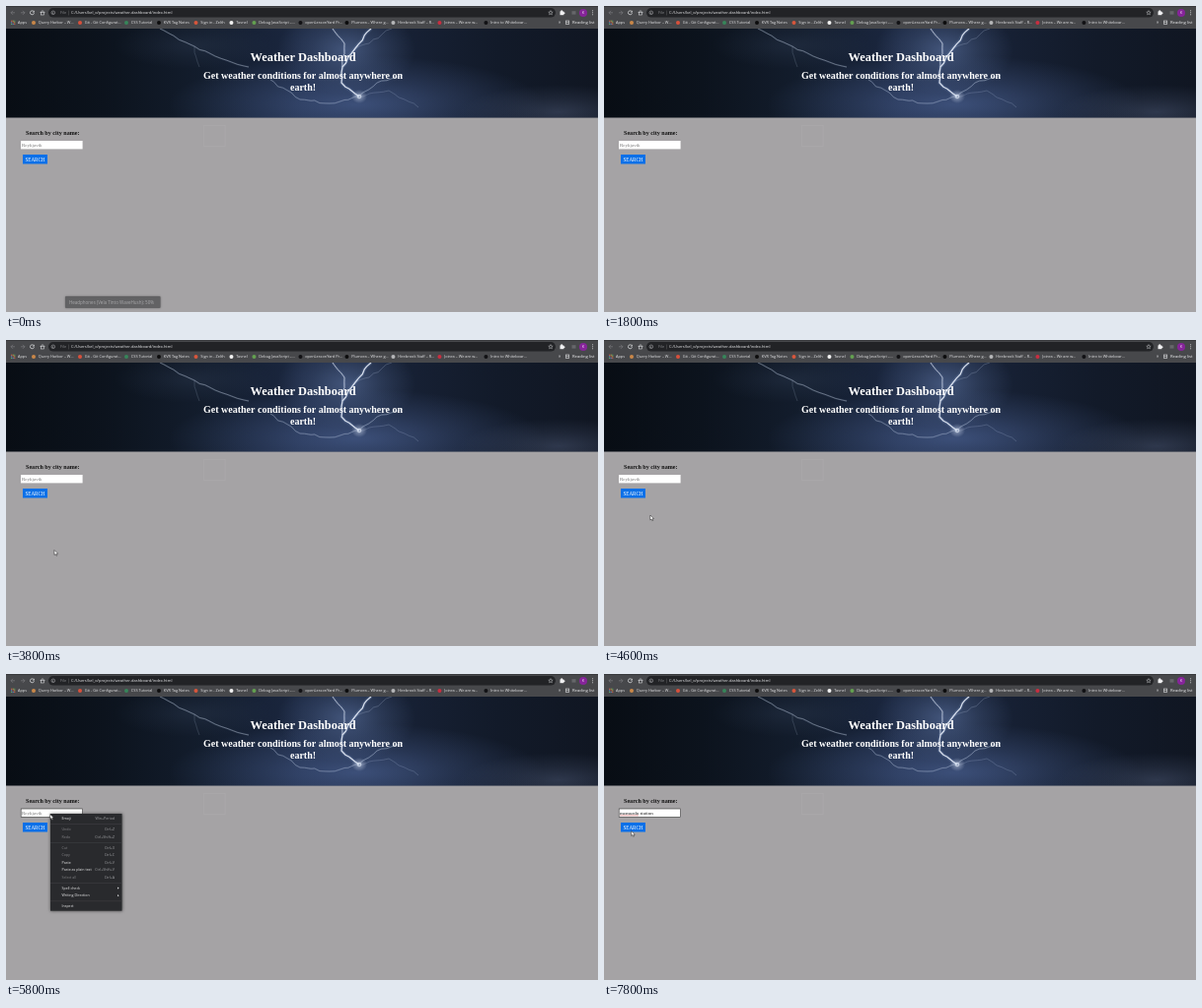
An HTML page with a canvas for the animation above (8 s loop, 600 px wide and 311 px high).

```html
<!DOCTYPE html>
<html lang="en">
<head>
<meta charset="utf-8">
<title>Weather Dashboard</title>
<style>
html, body { margin: 0; width: 100%; height: 100%; overflow: hidden; background: #a5a3a5; }
canvas { display: block; width: 600px; height: 311px; }
</style>
</head>
<body>
<canvas id="stage"></canvas>
<script>
const W = 600, H = 311, LOOP = 8000, STEP = 200;
const SANS = '"Open Sans", "Noto Sans", sans-serif';
const SERIF = '"Liberation Serif", serif';
const TOAST_END = 800, FOCUS = 5200, MENU_OPEN = 5800, PASTE = 7200;

const canvas = document.getElementById('stage');
const ratio = window.devicePixelRatio || 1;
canvas.width = W * ratio;
canvas.height = H * ratio;
const ctx = canvas.getContext('2d');
ctx.scale(ratio, ratio);

function rect(x, y, w, h, color) {
  ctx.fillStyle = color;
  ctx.fillRect(x, y, w, h);
}

function frame(x, y, w, h, color, width) {
  ctx.strokeStyle = color;
  ctx.lineWidth = width;
  ctx.strokeRect(x, y, w, h);
}

function pill(x, y, w, h, r, color) {
  ctx.fillStyle = color;
  ctx.beginPath();
  ctx.roundRect(x, y, w, h, r);
  ctx.fill();
}

function disc(x, y, r, color) {
  pill(x - r, y - r, 2 * r, 2 * r, r, color);
}

function ring(x, y, r, color, width, from = 0, to = Math.PI * 2) {
  ctx.strokeStyle = color;
  ctx.lineWidth = width;
  ctx.beginPath();
  ctx.arc(x, y, r, from, to);
  ctx.stroke();
}

function trace(points) {
  ctx.beginPath();
  for (const [x, y] of points) ctx.lineTo(x, y);
}

function line(points, color, width) {
  trace(points);
  ctx.strokeStyle = color;
  ctx.lineWidth = width;
  ctx.stroke();
}

function shape(points, color) {
  trace(points);
  ctx.closePath();
  ctx.fillStyle = color;
  ctx.fill();
}

function text(str, x, y, size, color, family = SANS, align = 'left', weight = 400) {
  ctx.font = `${weight} ${size}px ${family}`;
  ctx.textAlign = align;
  ctx.fillStyle = color;
  ctx.fillText(str, x, y);
}

function seeded(seed) {
  return () => {
    seed = (seed * 16807) % 2147483647;
    return seed / 2147483647;
  };
}

function starPoints(x, y, r) {
  return Array.from({ length: 11 }, (_, i) => {
    const a = -Math.PI / 2 + i * Math.PI / 5, d = i % 2 ? r * 0.45 : r;
    return [x + d * Math.cos(a), y + d * Math.sin(a)];
  });
}

function navArrow(x, dir, color) {
  line([[x - 2 * dir, 6.8], [x + 2 * dir, 6.8]], color, 0.7);
  line([[x, 4.8], [x + 2 * dir, 6.8], [x, 8.8]], color, 0.7);
}

function toolbar() {
  const pale = '#d6d7d9', dim = '#7b7c80';
  rect(0, 0, W, 23, '#47484b');
  rect(0, 0, W, 1, '#37383b');
  navArrow(7, -1, dim);
  navArrow(17, 1, dim);
  ring(26.5, 6.8, 2, pale, 0.8, 0.2, 5.5);
  shape([[28.8, 4.4], [28.8, 6.6], [26.8, 6.4]], pale);
  line([[34.6, 7], [37, 4.6], [39.4, 7]], pale, 0.7);
  frame(35.5, 6.4, 3, 2.6, pale, 0.6);

  pill(43, 2, 514, 9.6, 4.8, '#222326');
  ring(47.8, 6.8, 1.8, '#c4c5c8', 0.5);
  rect(47.5, 6.4, 0.6, 1.5, '#c4c5c8');
  text('File', 55, 8.3, 4, '#85868a');
  rect(63.4, 4.5, 0.4, 5, '#66676a');
  text('C:/Users/kel_o/projects/weather-dashboard/index.html', 66, 8.3, 4, '#ececee');

  line(starPoints(552, 6.9, 2.3), '#c9cacc', 0.5);
  rect(561.5, 5.4, 3.8, 3.8, '#f0f0f2');
  disc(563.2, 5.2, 1, '#f0f0f2');
  disc(565.5, 7.3, 1, '#f0f0f2');
  rect(573.5, 5.2, 4, 3.4, '#66676a');
  disc(585, 6.9, 4, '#86249a');
  text('K', 585, 8.3, 4, '#f0d8f4', SANS, 'center');
  for (let i = 0; i < 3; i++) disc(594.6, 4.8 + 2 * i, 0.55, pale);
}

const bookmarks = [
  ['#c98748', 'Query Harbor – W…'],
  ['#d8503c', 'Git - Git Configurat…'],
  ['#37855a', 'CSS Tutorial'],
  ['#0c0c0d', 'KVR Tag Notes'],
  ['#d8563c', 'Sign in - Zelth'],
  ['#f2f2f2', 'Tavnel'],
  ['#63a050', 'Debug JavaScript –…'],
  ['#111114', 'openLessonYard Pr…'],
  ['#0c0c0d', 'Plumora – Where g…'],
  ['#b5b6b8', 'Hirebrook Staff – R…'],
  ['#c92e40', 'Joinra – We are w…'],
  ['#111114', 'Intro to Whiteboar…']
];

function bookmarkBar() {
  const hues = ['#c95b4b', '#c9a84a', '#5aa765', '#5a8dc8'];
  for (let i = 0; i < 9; i++)
    rect(5 + (i % 3) * 1.6, 14.7 + Math.floor(i / 3) * 1.6, 1.1, 1.1, hues[i % 4]);
  text('Apps', 12, 18.4, 3.9, '#e4e4e6');
  let x = 28;
  for (const [color, label] of bookmarks) {
    disc(x, 16.9, 2, color);
    text(label, x + 4.8, 18.4, 3.9, '#e4e4e6');
    // cut labels fill the widest slot
    x += label.endsWith('…') ? 47 : ctx.measureText(label).width + 11.5;
  }
  text('»', 560, 18.4, 4.5, '#e4e4e6');
  frame(567.3, 15, 3.4, 3.6, '#dddee0', 0.6);
  rect(567.3, 16.5, 3.4, 0.6, '#dddee0');
  text('Reading list', 574, 18.4, 4.2, '#f0f0f2');
}

function glow(x, y, rx, ry, rgb, alpha) {
  ctx.save();
  ctx.translate(x, y);
  ctx.scale(rx, ry);
  const g = ctx.createRadialGradient(0, 0, 0, 0, 0, 1);
  g.addColorStop(0, `rgba(${rgb},${alpha})`);
  g.addColorStop(0.5, `rgba(${rgb},${alpha * 0.45})`);
  g.addColorStop(1, `rgba(${rgb},0)`);
  ctx.fillStyle = g;
  ctx.fillRect(-1, -1, 2, 2);
  ctx.restore();
}

// Jagged line through key points
function bolt(keys, width, alpha, seed) {
  const rnd = seeded(seed), points = [keys[0]];
  for (let i = 1; i < keys.length; i++) {
    const [x0, y0] = keys[i - 1], [x1, y1] = keys[i];
    const n = Math.ceil(Math.hypot(x1 - x0, y1 - y0) / 6);
    for (let k = 1; k <= n; k++) {
      const wobble = k < n ? 2.4 : 0;
      points.push([
        x0 + (x1 - x0) * k / n + (rnd() - 0.5) * wobble,
        y0 + (y1 - y0) * k / n + (rnd() - 0.5) * wobble
      ]);
    }
  }
  line(points, `rgba(120,145,190,${alpha * 0.2})`, width * 3);
  line(points, `rgba(222,229,242,${alpha})`, width);
}

function hero() {
  ctx.save();
  ctx.beginPath();
  ctx.rect(0, 23, W, 90.5);
  ctx.clip();
  const sky = ctx.createLinearGradient(0, 0, W, 0);
  ['#080d14', '#0c131d', '#131d2d', '#1b2740', '#172135', '#121a29', '#101622']
    .forEach((color, i) => sky.addColorStop(i / 6, color));
  rect(0, 23, W, 91, sky);
  glow(355, 100, 190, 50, '72,94,142', 0.75);
  glow(345, 45, 70, 45, '84,106,150', 0.7);
  glow(560, 108, 100, 28, '76,88,116', 0.5);
  glow(190, 40, 80, 24, '50,64,88', 0.35);

  ctx.lineJoin = 'round';
  const hub = [358, 92], bend = [341, 62];
  bolt([[370, 23], [354, 43], bend, [340, 78], hub], 1.3, 0.95, 11);
  bolt([[331, 23], [343, 38], bend], 1, 0.7, 23);
  bolt([[391, 23], [368, 38], [354, 43]], 0.4, 0.4, 31);
  bolt([[156, 23], [191, 41], [212, 51], [246, 62]], 0.6, 0.6, 47);
  bolt([[191, 41], [196, 62]], 0.4, 0.3, 53);
  bolt([[268, 75], [298, 95], [328, 99], hub], 0.6, 0.5, 61);
  bolt([hub, [376, 78], [402, 70]], 0.6, 0.55, 71);
  bolt([hub, [388, 86], [418, 103]], 0.4, 0.35, 83);
  glow(...hub, 8, 7, '215,226,247', 0.6);
  ring(...hub, 1.8, '#e6edf8', 0.7);
  ctx.restore();

  text('Weather Dashboard', 301, 55.9, 12.4, '#fff', SERIF, 'center', 700);
  text('Get weather conditions for almost anywhere on', 301, 73.7, 10, '#fff', SERIF, 'center', 700);
  text('earth!', 301, 85.7, 10, '#fff', SERIF, 'center', 700);
}

function searchForm(t) {
  text('Search by city name:', 20, 131.4, 6.1, '#111', SERIF, 'left', 700);
  rect(15, 137, 62.6, 8.4, '#fff');
  if (t >= FOCUS) frame(15.2, 137, 62.4, 8.4, '#333', 0.6);
  if (t >= PASTE) {
    text('mcmurdo station', 16, 142.9, 5, '#181818', SERIF);
    const wave = Array.from({ length: 20 }, (_, i) => [16 + i, 143.8 + 0.35 * (-1) ** i]);
    line(wave, '#e04848', 0.5);
  } else {
    text('Reykjavik', 16, 143, 5, '#777', SERIF);
  }
  rect(17, 151, 25, 9.5, '#0b70e8');
  text('SEARCH', 29.5, 157.5, 5.1, '#fff', SERIF, 'center');
  frame(200.7, 121.4, 21.4, 21.4, '#adabad', 0.6);
}

function shadowed(blur, alpha, paint) {
  ctx.save();
  ctx.shadowColor = `rgba(0,0,0,${alpha})`;
  ctx.shadowBlur = blur * ratio;
  paint();
  ctx.restore();
}

function toast() {
  shadowed(2, 0.4, () => pill(60, 295, 96.5, 12, 1, '#626264'));
  text('Headphones (Vela Tinto WaveHush): 50%', 64, 302.6, 4.5, '#a9a9ab');
}

// A leading "-" marks a disabled entry, "▸" a submenu
const menuGroups = [
  ['Emoji|Win+Period'],
  ['-Undo|Ctrl+Z', '-Redo|Ctrl+Shift+Z'],
  ['-Cut|Ctrl+X', '-Copy|Ctrl+C', 'Paste|Ctrl+V', 'Paste as plain text|Ctrl+Shift+V', '-Select all|Ctrl+A'],
  ['Spell check|▸', 'Writing Direction|▸'],
  ['Inspect|']
];

function menuRow(entry, y, pointerY) {
  const enabled = entry[0] !== '-';
  const [label, key] = entry.replace(/^-/, '').split('|');
  const hover = enabled && Math.abs(pointerY - y) < 3.75;
  if (hover) rect(45, y - 3.8, 72.5, 7.6, '#47484c');
  text(label, 56.5, y + 1.3, 3.6, enabled ? '#ededee' : '#808184');
  if (key === '▸') shape([[113, y - 1.2], [114.6, y], [113, y + 1.2]], '#d5d5d7');
  else text(key, 110, y + 1.3, 3.6, hover ? '#ededee' : '#a0a1a4', SANS, 'right');
}

function contextMenu(pointerY) {
  const rowH = 7.55, gap = 3.4;
  shadowed(3, 0.55, () => rect(45, 142, 72.5, 98.7, '#292a2d'));
  let y = 147;
  menuGroups.forEach((group, i) => {
    if (i) {
      rect(45, y - (rowH + gap) / 2, 72.5, 0.5, '#424347');
    }
    for (const entry of group) {
      menuRow(entry, y, pointerY);
      y += rowH;
    }
    y += gap;
  });
}

// Pointer moves: start, end, target
const entry = { at: 3400, x: 56, y: 247 };
const moves = [
  [3400, 3800, 49, 213.5],
  [4200, 5000, 44.7, 142.5],
  [6200, 6800, 75.7, 191.6],
  [7200, 7800, 27.7, 159.5]
];

function pointerAt(t) {
  if (t < entry.at) return null;
  let { x, y } = entry;
  for (const [start, end, toX, toY] of moves) {
    const u = Math.min(1, Math.max(0, (t - start) / (end - start)));
    const k = u * u * (3 - 2 * u);
    x += (toX - x) * k;
    y += (toY - y) * k;
  }
  return { x, y };
}

function pointer({ x, y }, t) {
  if (t < MENU_OPEN && y > 136 && y < 146) {
    line([[x, y - 2.6], [x, y + 2.6]], '#222', 0.6);
    for (const d of [-2.7, 2.7]) line([[x - 1, y + d], [x + 1, y + d]], '#222', 0.5);
    return;
  }
  const arrow = [[0, 0], [0, 5], [1.2, 4], [2, 5.8], [2.9, 5.4], [2.1, 3.7], [3.6, 3.6]]
    .map(([dx, dy]) => [x + dx, y + dy]);
  shape(arrow, '#fff');
  line([...arrow, arrow[0]], '#202020', 0.5);
}

function draw(t) {
  rect(0, 0, W, H, '#a5a3a5');
  toolbar();
  bookmarkBar();
  hero();
  searchForm(t);
  if (t < TOAST_END) toast();
  const p = pointerAt(t);
  if (t >= MENU_OPEN && t < PASTE) contextMenu(p.y);
  if (p) pointer(p, t);
}

function tick() {
  const t = performance.now() % LOOP;
  draw(Math.floor(t / STEP) * STEP);
  requestAnimationFrame(tick);
}
tick();
</script>
</body>
</html>
```
